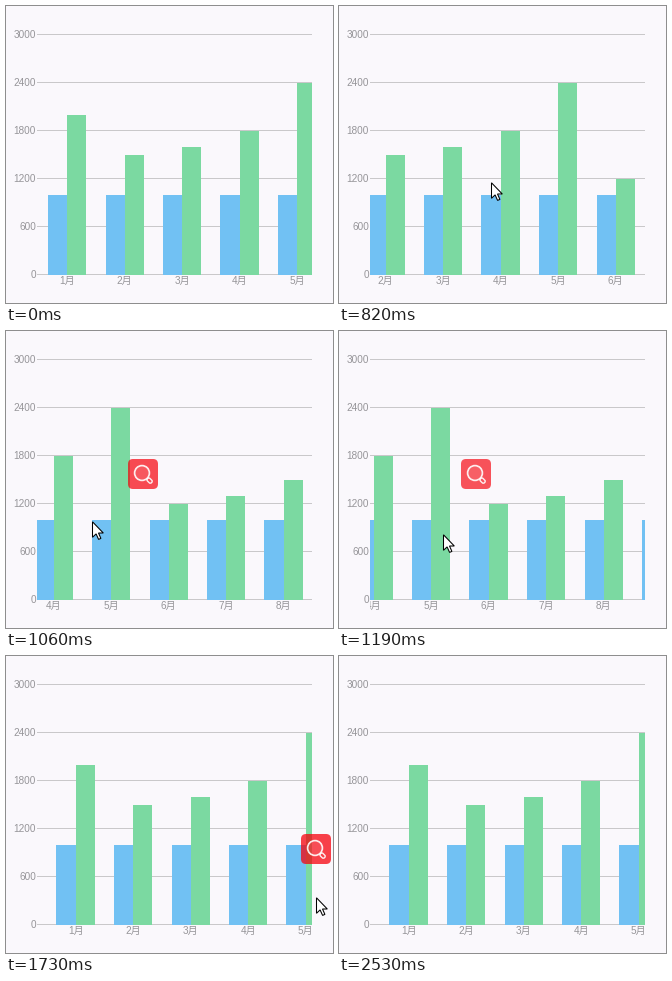
Animation of 327x297 px, one loop 2560 ms. Source, as a matplotlib script:

```python
import matplotlib.pyplot as plt
from matplotlib.animation import FuncAnimation
from matplotlib.patches import Circle, FancyBboxPatch, Polygon, Rectangle
from matplotlib.transforms import Affine2D

W, H, DPI = 327, 297, 64
TICK = 10
LOOP = 2560
PT = 72 / DPI  # points per pixel

BACK = "#faf8fc"
GRID = "#c9c8ca"
INK = "#969599"
BLUE = "#71c1f3"
GREEN = "#7bd9a1"
RED = (0.97, 0.0, 0.04)

LEFT, RIGHT, BASE = 31, 306, 268
SCALE = 48 / 600
STEP, BAR, FIRST = 57.5, 19.2, 42
SALES = [2000, 1500, 1600, 1800, 2400, 1200, 1300, 1500, 1800]
TARGET = 1000

MID = (122, 128)
SIDE = (295, 178)

# start ms, chart scroll, pointer tip, search button corner, button opacity
STEPS = [
    (0, 0, None, None, 0),
    (120, 0, (245, 234), None, 0),
    (270, 0, (256, 204), None, 0),
    (390, 0, (253, 182), None, 0),
    (670, 0, (227, 176), None, 0),
    (820, -72, (152, 176), None, 0),
    (940, -151, (80, 176), MID, 0.73),
    (1060, -186, (86, 190), MID, 0.70),
    (1190, -199, (104, 203), MID, 0.67),
    (1320, -201, (148, 214), MID, 0.67),
    (1460, -170, (218, 223), None, 0),
    (1580, -82.3, (318, 231), SIDE, 0.74),
    (1730, 8.5, (310, 241), SIDE, 0.74),
    (1850, 8.5, (303, 280), SIDE, 0.74),
    (1970, 8.5, None, SIDE, 0.74),
    (2530, 8.5, None, None, 0),
]

plt.rcParams["font.family"] = ["Liberation Sans", "Noto Sans CJK JP"]
fig = plt.figure(figsize=(W / DPI, H / DPI), dpi=DPI, facecolor=BACK)
ax = fig.add_axes([0, 0, 1, 1])
ax.set_xlim(0, W)
ax.set_ylim(H, 0)
ax.axis("off")

window = Rectangle((LEFT, H), RIGHT - LEFT, -H, transform=ax.transData)


def label(x, y, text, align):
    return ax.text(x, y, text, color=INK, fontsize=10 * PT, ha=align,
                   va="baseline", zorder=3)


def add_bar(value, color):
    height = value * SCALE
    bar = Rectangle((0, BASE + 0.5 - height), BAR, height, fc=color, lw=0, zorder=2)
    ax.add_patch(bar)
    bar.set_clip_path(window)
    return bar


def place_bar(bar, x):
    start, end = round(x), round(x + BAR)
    bar.set_x(start)
    bar.set_width(end - start)


for value in range(0, 3001, 600):
    y = BASE - value * SCALE
    ax.add_patch(Rectangle((LEFT, y), RIGHT - LEFT, 1, fc=GRID, lw=0, zorder=1))
    label(30, y + 4, str(value), "right")

months = []
for i, amount in enumerate(SALES):
    name = label(0, 278, f"{i + 1}月", "center")
    name.set_clip_on(True)
    name.set_clip_path(window)
    months.append((add_bar(TARGET, BLUE), add_bar(amount, GREEN), name))

# Search button, built at the origin and moved by a shared transform
button_shift = Affine2D()
button_place = button_shift + ax.transData
tile = FancyBboxPatch((0, 0), 30, 30, boxstyle="round,pad=0,rounding_size=5",
                      fc=RED, lw=0, transform=button_place, zorder=5)
lens = Circle((14, 14), 7.4, fc=(1, 1, 1, 0.08), ec=(1, 1, 1, 0.9),
              lw=1.7 * PT, transform=button_place, zorder=6)
tilt = Affine2D().rotate_deg(45).translate(21.6, 21.6)
handle = FancyBboxPatch((-2.8, -1.8), 5.6, 3.6,
                        boxstyle="round,pad=0,rounding_size=1.6",
                        fc="none", ec=(1, 1, 1, 0.9), lw=1.4 * PT,
                        transform=tilt + button_place, zorder=6)
button = [tile, lens, handle]
for part in button:
    ax.add_patch(part)

pointer_shift = Affine2D()
arrow = [(0.5, 0.8), (0.5, 16.3), (4.1, 12.9), (6.6, 18.4),
         (8.9, 17.4), (6.5, 12), (11.3, 12)]
pointer = ax.add_patch(Polygon(arrow, fc="white", ec="black", lw=1.05 * PT,
                               joinstyle="miter",
                               transform=pointer_shift + ax.transData, zorder=8))


def draw(frame):
    now = frame * TICK
    _, scroll, tip, corner, opacity = [s for s in STEPS if s[0] <= now][-1]

    for i, (blue, green, name) in enumerate(months):
        x = FIRST + STEP * i + scroll
        place_bar(blue, x)
        place_bar(green, x + BAR)
        name.set_x(x + BAR)

    pointer.set_visible(tip is not None)
    if tip:
        pointer_shift.clear().translate(*tip)

    for part in button:
        part.set_visible(corner is not None)
    if corner:
        button_shift.clear().translate(*corner)
        tile.set_alpha(opacity)
    return []


anim = FuncAnimation(fig, draw, frames=LOOP // TICK, interval=TICK,
                     repeat=True, repeat_delay=0, blit=False)
plt.show()
```
